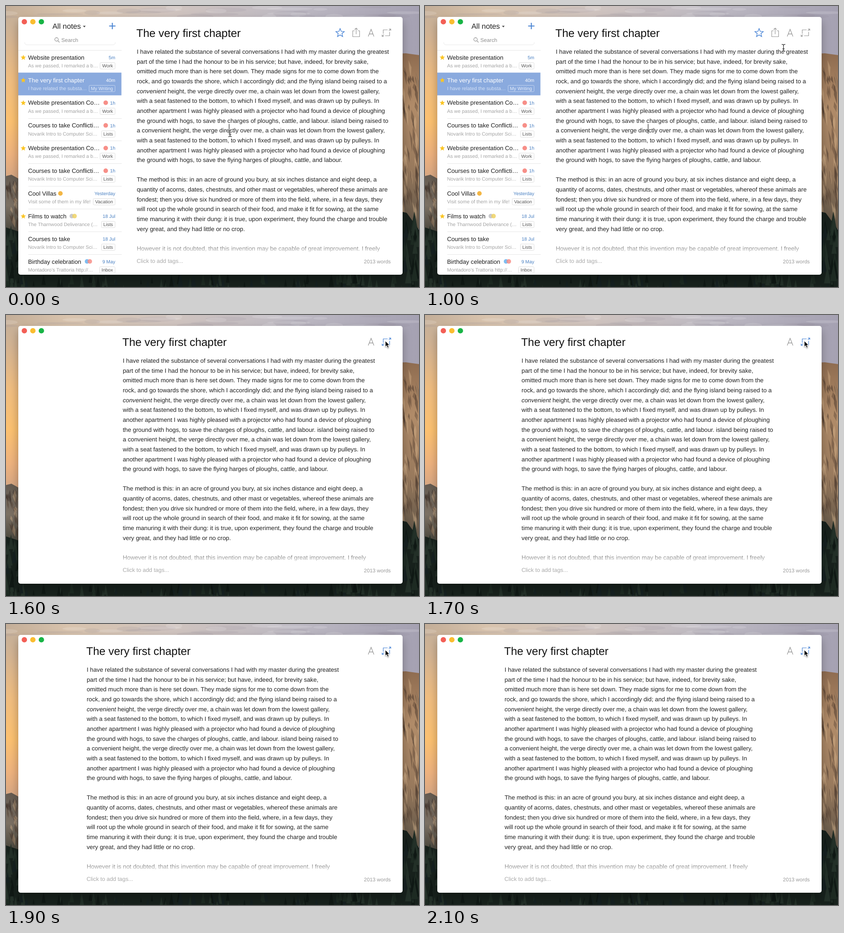
An HTML page that plays this animation: 907x618 px, repeating every 3100 ms.

```html
<!DOCTYPE html>
<html lang="en">
<head>
<meta charset="utf-8">
<title>Notes focus mode</title>
<style>
html, body { margin: 0; width: 100%; height: 100%; overflow: hidden; }
svg { display: block; width: 100%; height: 100%; }
text { font-family: "Liberation Sans", Arial, sans-serif; text-rendering: geometricPrecision; white-space: pre; }
.icon { fill: none; stroke: #999; stroke-width: 1.2; }
</style>
</head>
<body>
<svg viewBox="0 0 907 618" xmlns="http://www.w3.org/2000/svg">
  <defs>
    <linearGradient id="top">
      <stop offset="0" stop-color="#c2ad98"/><stop offset=".15" stop-color="#d8c3ad"/>
      <stop offset=".4" stop-color="#d0c4bf"/><stop offset=".7" stop-color="#bdb9c3"/>
      <stop offset="1" stop-color="#a5a1b2"/>
    </linearGradient>
    <linearGradient id="glow" x2="0" y2="1">
      <stop offset="0" stop-color="#d0b697" stop-opacity="0"/><stop offset=".18" stop-color="#d3b392"/>
      <stop offset=".42" stop-color="#f0bd80"/><stop offset=".66" stop-color="#fcc170"/>
      <stop offset=".85" stop-color="#eeb27e"/><stop offset="1" stop-color="#d3a584"/>
    </linearGradient>
    <linearGradient id="ridge" x2="0" y2="1">
      <stop offset="0" stop-color="#645a50"/><stop offset=".45" stop-color="#7b7063"/>
      <stop offset="1" stop-color="#35352d"/>
    </linearGradient>
    <linearGradient id="rock" x2="0" y2="1">
      <stop offset="0" stop-color="#8f6c50"/><stop offset=".3" stop-color="#b18c69"/>
      <stop offset=".65" stop-color="#997a5d"/><stop offset="1" stop-color="#5c5245"/>
    </linearGradient>
    <linearGradient id="fade" x2="0" y2="1">
      <stop offset="0" stop-color="#fff" stop-opacity="0"/><stop offset="1" stop-color="#fff"/>
    </linearGradient>
    <filter id="shadow" x="-10%" y="-10%" width="120%" height="125%">
      <feDropShadow dx="0" dy="9" stdDeviation="10" flood-opacity=".3"/>
    </filter>
    <filter id="soft" x="-50%" y="-50%" width="200%" height="200%">
      <feDropShadow dx="0" dy="1.5" stdDeviation="1.2" flood-opacity=".4"/>
    </filter>
    <clipPath id="win"><rect x="27" y="24" width="844" height="567" rx="5"/></clipPath>
  </defs>

  <rect width="907" height="618" fill="url(#top)"/>
  <rect width="60" height="385" fill="url(#glow)"/>
  <path d="M0 374L12 371L28 380L60 384V520H0Z" fill="url(#ridge)"/>
  <path d="M840 106L878 104L907 108V490H840Z" fill="url(#rock)"/>
  <g id="texture"/>
  <path d="M0 487L40 500V580H860V450L880 455L907 492V618H0Z" fill="#17211c"/>
  <g id="trees"/>

  <rect x="27" y="24" width="844" height="567" rx="5" fill="#fff" filter="url(#shadow)"/>
  <g clip-path="url(#win)">
    <g id="side">
      <path d="M41 80Q41 85.500 47 85.500H234Q240 85.500 240 80" fill="none" stroke="#e9e9e9"/>
      <path d="M27 97.500H254" stroke="#e6e6e6"/>
      <path d="M169 43.500h6l-3 3.500z" fill="#444"/>
      <path d="M226.500 44H240.500M233.500 37V51" stroke="#4d86d3" stroke-width="2.200"/>
      <g fill="none" stroke="#8e8e8e" stroke-width="1.200">
        <circle cx="111" cy="73.500" r="3.800"/><path d="M113.800 76.300L117.500 80"/>
      </g>
      <g id="rows"></g>
    </g>
    <g id="page"></g>
    <g class="icon">
      <g id="extra">
        <path id="favourite" stroke="#4a85d6" stroke-width="1.400"/>
        <path d="M765.500 54.500H761.500V67.500H776.500V54.500H772.500M769 62V48.500M765.500 52L769 48.500L772.500 52"/>
      </g>
      <path d="M795.500 67L801.800 51.200L808 67M797.800 61.500H805.800" stroke-width="1.300"/>
      <path id="focus" d="M838 52.500H828.500V61M832.500 65.500H842.500V57M841 50.500H845V54.500M845 50.500L841 54.500M826 63V67H830M826 67L830 63"/>
    </g>
    <g id="lights"></g>
  </g>
  <path id="caret" d="M490 259.500V281" stroke="#222" stroke-width="1.200"/>
  <g id="beam" fill="none" stroke-linecap="round">
    <path d="M-3.500 -7.500Q0 -7.500 0 -5V5Q0 7.500 -3.500 7.500M3.500 -7.500Q0 -7.500 0 -5V5Q0 7.500 3.500 7.500M-2 2.500H2" stroke="#fff" stroke-width="2.600"/>
    <path d="M-3.500 -7.500Q0 -7.500 0 -5V5Q0 7.500 -3.500 7.500M3.500 -7.500Q0 -7.500 0 -5V5Q0 7.500 3.500 7.500M-2 2.500H2" stroke="#222" stroke-width="1.200"/>
  </g>
  <path id="arrow" d="M0 0V13L3 10.200L5.200 15.200L7.600 14.200L5.400 9.300H9.300Z" stroke="#fff" stroke-width="1" filter="url(#soft)"/>
</svg>
<script>
const $ = id => document.getElementById(id);
const STEP = 100, LOOP = 3100, PITCH = 49.87, LEADING = 21.63;
const PAGE_X = 287, FOCUS_X = 174.5;

const label = (x, y, size, fill, str, end) =>
  `<text x="${x}" y="${y}" font-size="${size}" fill="${fill}"${end ? ' text-anchor="end"' : ''}>${str}</text>`;
const dot = (x, y, r, fill) => `<circle cx="${x}" cy="${y}" r="${r}" fill="${fill}"/>`;

function starPath(cx, cy, r) {
  let d = '';
  for (let i = 0; i < 10; i++) {
    const a = i * Math.PI / 5, q = i % 2 ? r * 0.44 : r;
    d += (i ? 'L' : 'M') + (cx + q * Math.sin(a)).toFixed(2) + ' ' + (cy - q * Math.cos(a)).toFixed(2);
  }
  return d + 'Z';
}

let seed = 7;
const rnd = () => (seed = seed * 16807 % 2147483647) / 2147483647;
const pick = list => list[rnd() * list.length | 0];

// Soft clouds, cracked rock faces and dark firs around the window
function scenery() {
  let texture = '', trees = '';
  for (let i = 0; i < 30; i++) {
    texture += `<ellipse cx="${rnd() * 907}" cy="${rnd() * 26}" rx="${15 + rnd() * 40}" ry="${2 + rnd() * 4}" fill="${pick(['#fff', '#8d8796'])}" opacity=".14"/>`;
  }
  const crack = (x, y, len) =>
    `<path d="M${x} ${y}l${2 + rnd() * 5} ${len * 0.4}l${rnd() * 4 - 2} ${len * 0.6}l${-3 - rnd() * 4} ${-len * 0.5}z" fill="${pick(['#2f241d', '#4d3a2d', '#d9b78f'])}" opacity=".4"/>`;
  for (let i = 0; i < 60; i++) texture += crack(868 + rnd() * 40, 112 + rnd() * 330, 15 + rnd() * 35);
  for (let i = 0; i < 35; i++) texture += crack(rnd() * 30, 382 + rnd() * 90, 10 + rnd() * 20);
  const tree = (x, y, h) =>
    `<path d="M${x} ${y - h}l${h * 0.18} ${h}h${-h * 0.36}z" fill="${pick(['#0f1814', '#1d2a22', '#152020', '#233028'])}"/>`;
  for (let i = 0; i < 110; i++) trees += tree(rnd() * 907, 608 + rnd() * 18, 10 + rnd() * 22);
  for (let i = 0; i < 16; i++) trees += tree(rnd() * 28, 515 + i * 6, 18 + rnd() * 18);
  for (let i = 0; i < 24; i++) trees += tree(872 + rnd() * 35, 495 + i * 5, 20 + rnd() * 25);
  $('texture').innerHTML = texture;
  $('trees').innerHTML = trees;
}

const RED = '#f78f88';
const walk = 'As we passed, I remarked a b…', course = 'Novarik Intro to Computer Sci…';
// title, date, preview, tag, starred, dots as [x, colour]
const notes = [
  ['Website presentation', '5m', walk, 'Work', 1],
  ['The very first chapter', '40m', 'I have related the substa…', 'My Writing', 1],
  ['Website presentation Co…', '1h', walk, 'Work', 1, [219, RED]],
  ['Courses to take Conflicti…', '1h', course, 'Lists', 0, [219, RED]],
  ['Website presentation Co…', '1h', walk, 'Work', 1, [219, RED]],
  ['Courses to take Conflicti…', '1h', course, 'Lists', 0, [219, RED]],
  ['Cool Villas', 'Yesterday', 'Visit some of them in my life!', 'Vacation', 0, [119.5, '#f3b644']],
  ['Films to watch', '18 Jul', 'The Tharnwood Deliverance (…', 'Lists', 1, [144.5, '#c9c9cd'], [150.5, '#efd265']],
  ['Courses to take', '18 Jul', course, 'Lists', 0],
  ['Birthday celebration', '9 May', 'Montadoro’s Trattoria http://…', 'Inbox', 0, [178, '#7fbdf0'], [184, RED]]
];

function sidebar() {
  let out = label(102, 50, 16.3, '#222', 'All notes') + label(121.5, 79, 11.7, '#8e8e8e', 'Search');
  notes.forEach(([title, date, preview, tag, starred, ...dots], i) => {
    const y = 113 + i * PITCH, on = i === 1;
    if (on) out += '<rect x="27" y="146.500" width="226.500" height="50" fill="#8aaade"/>';
    else if (i > 2) out += `<path d="M49 ${Math.round(y - 16) + 0.5}H254" stroke="#e6e6e6"/>`;
    if (starred) out += `<path d="${starPath(38, y + 0.5, 6.2)}" fill="#fbc524"/>`;
    out += label(48.5, y + 4.7, 13.2, on ? '#fff' : '#1c1c1c', title);
    out += label(240, y + 3.9, 10.4, on ? '#fff' : '#4a80c2', date, true);
    out += label(48.5, y + 22, 10.8, on ? '#d3e0f5' : '#a3a3a3', preview);
    out += `<g class="tag"><rect y="${Math.round(y + 11) + 0.5}" height="14" rx="2" fill="none" stroke="${on ? '#c3d4f0' : '#dedede'}"/>` +
      label(235, y + 21.9, 10.3, on ? '#e6eefb' : '#555', tag, true) + '</g>';
    dots.forEach(([x, fill], n) => {
      out += dot(x, y, 5, fill).replace('/>', n ? ' fill-opacity=".85"/>' : '/>');
    });
  });
  $('rows').innerHTML = out;
  document.querySelectorAll('.tag').forEach(g => {
    const w = g.lastChild.getComputedTextLength() + 9;
    g.firstChild.setAttribute('x', Math.round(239 - w) + 0.5);
    g.firstChild.setAttribute('width', Math.round(w));
  });
}

const story = `I have related the substance of several conversations I had with my master during the greatest
part of the time I had the honour to be in his service; but have, indeed, for brevity sake,
omitted much more than is here set down. They made signs for me to come down from the
rock, and go towards the shore, which I accordingly did; and *the* flying island being raised to a
*convenient* height, the verge directly over me, a chain was let down from the lowest gallery,
with a seat fastened to the bottom, to which I fixed myself, and was drawn up by pulleys. In
another apartment I was highly pleased with a projector who had found a device of ploughing
the ground with hogs, to save the charges of ploughs, cattle, and labour. island being raised to
a convenient height, the verge directly over me, a chain was let down from the lowest gallery,
with a seat fastened to the bottom, to which I fixed myself, and was drawn up by pulleys. In
another apartment I was highly pleased with a projector who had found a device of ploughing
the ground with hogs, to save the flying harges of ploughs, cattle, and labour.

The method is this: in an acre of ground you bury, at six inches distance and eight deep, a
quantity of acorns, dates, chestnuts, and other mast or vegetables, whereof these animals are
fondest; then you drive six hundred or more of them into the field, where, in a few days, they
will root up the whole ground in search of their food, and make it fit for sowing, at the same
time manuring it with their dung: it is true, upon experiment, they found the charge and trouble
very great, and they had little or no crop.

However it is not doubted, that this invention may be capable of great improvement. I freely`;

function page() {
  let out = label(-0.7, 68, 24.4, '#111', 'The very first chapter');
  story.split('\n').forEach((line, i) => {
    if (line) out += label(0.2, (105.2 + i * LEADING).toFixed(2), 13.27, '#222',
      line.replace(/\*(.+?)\*/g, '<tspan font-style="italic">$1</tspan>'));
  });
  out += '<rect x="-5" y="518" width="580" height="28" fill="url(#fade)"/>';
  out += label(0, 565, 12.4, '#aaa', 'Click to add tags...');
  $('page').innerHTML = out;
  $('lights').innerHTML = ['#f35f56', '#fabd30', '#17b445'].map((c, i) => dot(40.3 + 18.7 * i, 34.7, 5.9, c)).join('') +
    label(845, 565.5, 11.4, '#999', '2013 words', true);
  $('favourite').setAttribute('d', starPath(733.7, 59.3, 9.7));
}

const unit = p => Math.max(0, Math.min(1, p));
const show = (id, on) => $(id).setAttribute('display', on ? 'inline' : 'none');
const move = (id, x, y) => $(id).setAttribute('transform', `translate(${x.toFixed(2)} ${y.toFixed(2)})`);

function draw(time) {
  const t = Math.min(2100, Math.floor(time % LOOP / STEP) * STEP);
  const focused = t >= 1600;
  const go = (1 - Math.cos(Math.PI * unit((t - 170) / 1090))) / 2;
  const x = 492 + 341 * go, y = 280 - 223 * go ** 1.18;
  const pointer = y < 82;
  move('beam', x, y);
  move('arrow', x, y);
  show('beam', !pointer);
  show('arrow', pointer);
  show('caret', !focused && t % 1000 < 500);
  show('side', !focused);
  show('extra', !focused);
  $('focus').setAttribute('stroke', focused ? '#4a85d6' : '#999');
  const left = (1 - unit((t - 1551) / 485)) ** 3;
  move('page', FOCUS_X + (PAGE_X - FOCUS_X) * left, 0);
}

scenery();
sidebar();
page();
const start = performance.now();
function tick() {
  draw(performance.now() - start);
  requestAnimationFrame(tick);
}
tick();
</script>
</body>
</html>
```
